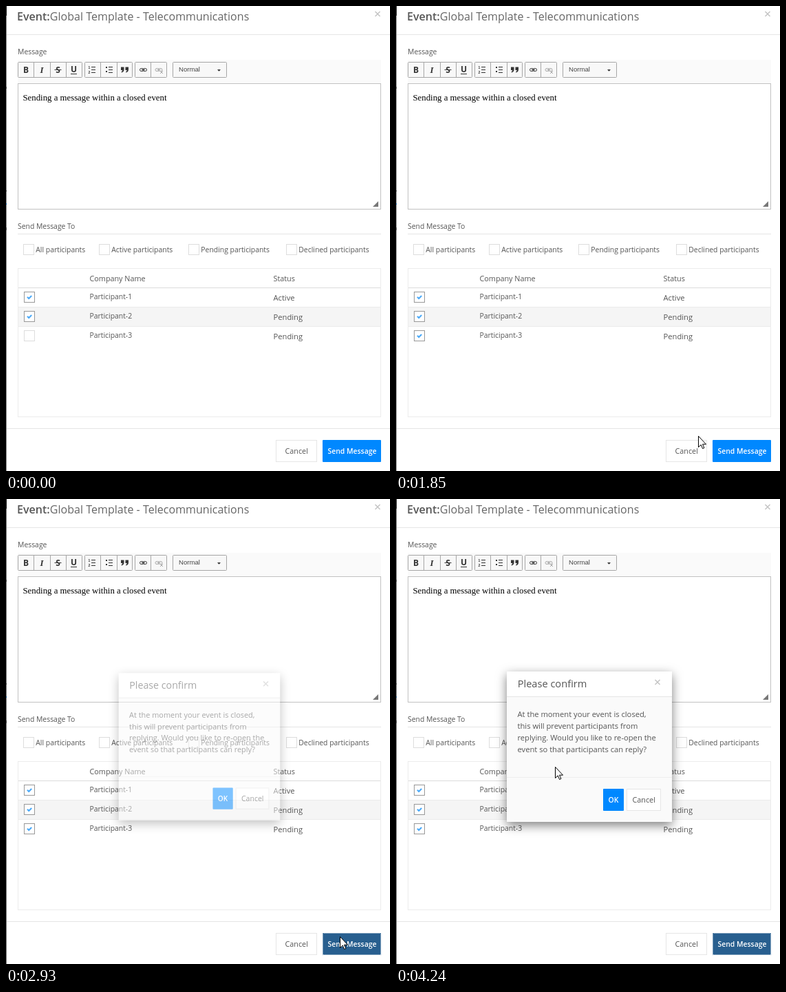
Animation, 558 px wide and 674 px high, one loop 5730 ms. Source, as an HTML page:

```html
<!DOCTYPE html>
<html lang="en">
<head>
<meta charset="utf-8">
<title>Send message dialog</title>
<style>
  html, body { margin: 0; width: 100%; height: 100%; overflow: hidden; background: #fff; }
  svg { display: block; width: 558px; height: 674px; cursor: default; }
  text { font: 10.4px "Open Sans", sans-serif; fill: #555; white-space: pre; }
  .title { font-size: 16px; fill: #666; letter-spacing: .03px; }
  .strong { font-weight: 600; }
  .head { font-size: 10.8px; }
  .cell { font-size: 11.2px; }
  .modalTitle { font-size: 14.6px; }
  .white { fill: #fff; font-weight: 600; }
  .typed { font: 12.8px "Liberation Serif", "Times New Roman", serif; fill: #000; }
  .pick { font: 9.6px "Liberation Sans", Arial, sans-serif; fill: #444; }
  .tool { font: bold 12px "Open Sans", sans-serif; fill: #333; text-anchor: middle; }
  .italic { font: italic bold 13px "Liberation Serif", serif; }
  .tiny { font: bold 5px "Liberation Sans", sans-serif; fill: #333; }
  .rule { fill: #e5e5e5; }
  .box { fill: #fff; stroke: #ddd; }
  .button { fill: #fff; stroke: #e6e6e6; }
  .group { fill: #f8f8f8; stroke: #a6a6a6; }
  .icon { fill: none; stroke: #333; }
  .close { fill: none; stroke: #c4c4c4; stroke-width: 1.5; }
  .pointer { fill: #fff; stroke: #000; stroke-linejoin: round; }
</style>
</head>
<body>
<svg viewBox="0 0 558 674">
  <defs>
    <filter id="shadow" x="-20%" y="-20%" width="140%" height="140%">
      <feDropShadow dx="0" dy="5" stdDeviation="7.5" flood-color="#000" flood-opacity=".5"/>
    </filter>
    <path id="cross" class="close" d="M-3.5-3.5l7 7m0-7l-7 7"/>
  </defs>

  <!-- page edge -->
  <rect width="1" height="674" fill="#848484"/>
  <path fill="#444" d="M0 117h1v3H0zm0 150h1v2H0zm0 54h1v4H0z"/>
  <rect y="286" width="1" height="2" fill="#0a5fa8"/>
  <rect id="dim" width="1" height="674" opacity="0"/>
  <rect width="1" height="14" fill="#111"/>

  <!-- header -->
  <text class="title" x="16" y="21"><tspan class="strong" fill="#555">Event:</tspan>Global Template - Telecommunications</text>
  <use href="#cross" x="540" y="11.5"/>
  <rect class="rule" x="1" y="41" width="557" height="1"/>

  <!-- editor -->
  <text x="17" y="70">Message</text>
  <rect x="17" y="78" width="528" height="34" fill="#fafafa"/>
  <g id="tools"></g>
  <text class="tool" x="29" y="97">B</text>
  <text class="tool italic" x="52" y="97">I</text>
  <text class="tool" x="75.5" y="97">S</text>
  <text class="tool" x="98.5" y="96">U</text>
  <path class="icon" d="M70.5 92.5h10M94 98.5h9"/>
  <path class="icon" d="M124 88.5h6m-6 4h6m-6 4h6M149 88.5h6m-6 4h6m-6 4h6"/>
  <text class="tiny" x="119.5" y="91">1</text>
  <text class="tiny" x="119.5" y="98">2</text>
  <path fill="#333" d="M145 88h2v2h-2zm0 6h2v2h-2z"/>
  <path id="quote" fill="#333" d="M167 88.5h4.5v3.5q0 3.5-3.5 4.5l-.5-1q1.5-.7 1.7-2.500H167z"/>
  <use href="#quote" x="6.5"/>
  <g id="link" class="icon">
    <rect x="194.5" y="90.5" width="5.5" height="4" rx="2"/>
    <rect x="199" y="90.5" width="5.5" height="4" rx="2"/>
    <path d="M197 92.5h5"/>
  </g>
  <g opacity=".4"><use href="#link" x="22.5"/><path class="icon" d="M224 94l4 4m0-4l-4 4"/></g>
  <rect class="group" x="242.5" y="81.5" width="78" height="22" rx="1"/>
  <text class="pick" x="251" y="95">Normal</text>
  <path fill="#333" d="M307 92h5l-2.5 2.8z"/>
  <rect x="17.5" y="112.5" width="527" height="182" fill="#fff" stroke="#c2c2c2"/>
  <path fill="#777" d="M541 283v8h-8z"/>
  <text class="typed" x="24.5" y="137">Sending a message within a closed event</text>

  <!-- recipients -->
  <text x="17" y="323">Send Message To</text>
  <rect class="rule" x="17" y="330" width="528" height="1"/>
  <g id="filters"></g>
  <rect x="17.5" y="380.5" width="527" height="215" fill="#fff" stroke="#ececec"/>
  <text class="head" x="121.5" y="399">Company Name</text>
  <text class="head" x="388.5" y="399">Status</text>
  <rect x="18" y="408" width="526" height="1" fill="#dcdcdc"/>
  <rect x="18" y="436" width="526" height="29" fill="#ebebeb"/>
  <rect x="18" y="437" width="526" height="27" fill="#f5f5f5"/>
  <g id="rows"></g>

  <!-- footer -->
  <rect class="rule" x="1" y="612" width="557" height="1"/>
  <rect class="button" x="392.5" y="629.5" width="59" height="31"/>
  <text class="head" x="405.5" y="649">Cancel</text>
  <rect id="send" x="460" y="629" width="85" height="32" rx="1"/>
  <rect id="focus" x="460.5" y="629.5" width="84" height="31" fill="none" stroke="#fff" stroke-opacity=".8" stroke-dasharray="1" stroke-dashoffset=".5"/>
  <text class="white" x="467.5" y="649">Send Message</text>

  <!-- confirmation -->
  <g id="modal">
    <rect x="161" y="250" width="240" height="218" fill="#fafafa" filter="url(#shadow)"/>
    <rect x="161" y="250" width="240" height="36" fill="#fff"/>
    <rect class="rule" x="161" y="286" width="240" height="1"/>
    <rect x="161" y="403" width="240" height="1" fill="#eee"/>
    <text class="modalTitle" x="176.7" y="273">Please confirm</text>
    <use href="#cross" x="380" y="265.5"/>
    <g id="question"></g>
    <rect x="301" y="420" width="30" height="32" rx="1" fill="#08f"/>
    <text class="white" x="308.5" y="440">OK</text>
    <rect class="button" x="335.5" y="420.5" width="49" height="31"/>
    <text class="head" x="343.5" y="440">Cancel</text>
  </g>

  <g id="cursor">
    <path id="arrow" class="pointer" d="M.5.5v16l3.7-3.5 2.4 5.5 2.3-1-2.4-5.3h5z"/>
    <path id="hand" class="pointer" d="M-2 2c0-2 3.4-2 3.4 0v6c.5-1.5 3.2-1.3 3.4.6.5-1.2 3-.9 3.2.8.6-1 2.6-.7 2.6 1.2v4c0 2-1.6 3-1.6 5v2H.5v-2c-1.6-2-3-4.5-5-7-1.3-1.7.8-3.2 2.5-1.8z"/>
  </g>
</svg>
<script>
const LOOP = 5730;
const HOVER_CHECK = 1050, CHECK = 1490, HOVER_SEND = 1920, SEND = 2490, BACKDROP = 2650;
const OPEN = 2790, OPENED = 3070;

const $ = id => document.getElementById(id);
const show = (id, on) => { $(id).style.display = on ? "" : "none"; };
const fill = (id, items, html) => { $(id).innerHTML = items.map(html).join(""); };
const clamp = v => Math.min(1, Math.max(0, v));
const progress = (t, from, to) => clamp((t - from) / (to - from));

const toolWidth = n => Math.round(n * 23.4);

fill("tools", [{ x: 17, n: 4 }, { x: 114, n: 3 }, { x: 187, n: 2 }], ({ x, n }) => {
  let html = `<rect class="group" x="${x + .5}" y="81.5" width="${toolWidth(n) - 1}" height="22" rx="1"/>`;
  for (let i = 1; i < n; i++) html += `<path class="group" d="M${x + toolWidth(i) + .5} 82v21"/>`;
  return html;
});

fill("filters", [[25, "All"], [135, "Active"], [265, "Pending"], [407, "Declined"]], ([x, kind]) =>
  `<rect class="box" x="${x + .5}" y="345.5" width="15" height="15"/>
   <text x="${x + 18.3}" y="357">${kind} participants</text>`);

fill("rows", ["Active", "Pending", "Pending"], (status, i) => {
  const y = 414 + i * 28;
  return `<rect id="check${i}" class="box" x="26.5" y="${y + .5}" width="15" height="15" style="stroke:#999"/>
    <path id="tick${i}" fill="none" stroke="#4aa9f8" stroke-width="2" d="M31 ${y + 7.8}l2.2 2.2 4-4"/>
    <text x="121.5" y="${y + 11}">Participant-${i + 1}</text>
    <text class="cell" x="388.5" y="${y + 13}">${status}</text>`;
});

fill("question", [
  "At the moment your event is closed,",
  "this will prevent participants from",
  "replying. Would you like to re-open the",
  "event so that participants can reply?"
], (line, i) => `<text class="cell" x="176.5" y="${316 + i * 17}">${line}</text>`);

// Each leg eases out to its point; sag bows the path downwards.
const origin = { x: 386, y: 635 };
const legs = [
  { from: 290, to: 1190, x: 36, y: 472, power: 3, sag: 0 },
  { from: 1490, to: 2170, x: 485, y: 634, power: 3, sag: 15 },
  { from: 3230, to: 3680, x: 289, y: 416, power: 1.15, sag: 15 },
  { from: 3930, to: 4240, x: 231, y: 388, power: 2, sag: 0 }
];

function cursorAt(t) {
  let { x, y } = origin;
  for (const leg of legs) {
    const rest = (1 - progress(t, leg.from, leg.to)) ** leg.power;
    x = leg.x + (x - leg.x) * rest;
    y = leg.y + (y - leg.y) * rest + 4 * leg.sag * rest * (1 - rest);
    if (t < leg.to) break;
  }
  return `translate(${Math.round(x)} ${Math.round(y)})`;
}

function draw(t) {
  const hand = t >= HOVER_SEND && t < BACKDROP;
  const open = progress(t, OPEN, OPENED);

  show("cursor", t >= legs[0].from);
  $("cursor").setAttribute("transform", cursorAt(t));
  show("hand", hand);
  show("arrow", !hand);

  $("check2").style.stroke = t >= HOVER_CHECK ? "#999" : "#ddd";
  show("tick2", t >= CHECK);
  $("send").setAttribute("fill", t >= HOVER_SEND ? "#285f8f" : "#08f");
  show("focus", t >= SEND);

  show("modal", open > 0);
  $("modal").setAttribute("opacity", open);
  $("modal").setAttribute("transform", `translate(281 359) scale(${.95 + .05 * open}) translate(-281 -359)`);
  $("dim").setAttribute("opacity", open * .25);
}

const start = performance.now();
function frame(now) {
  draw(Math.max(0, now - start) % LOOP);
  requestAnimationFrame(frame);
}
draw(0);
requestAnimationFrame(frame);
</script>
</body>
</html>
```
